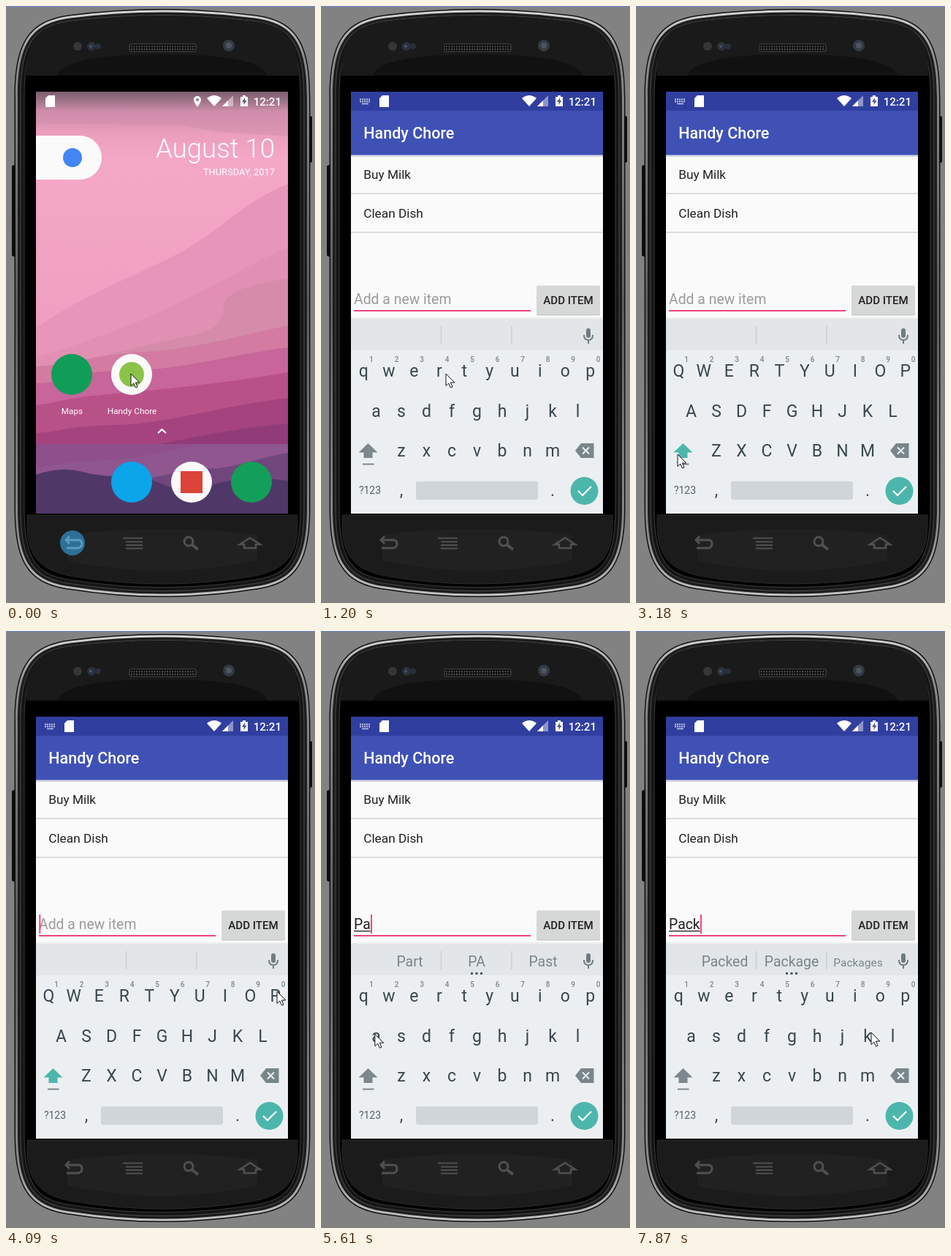
Recreate the animation shown at these times as an HTML page. Size 423 by 815 pixels, loop 7990 ms.

```html
<!DOCTYPE html>
<html lang="en">
<head>
<meta charset="utf-8">
<title>To-do app</title>
<style>
html, body { margin: 0; width: 100%; height: 100%; overflow: hidden; background: #828282; }
svg { display: block; width: 423px; height: 815px; font-family: Roboto, "Open Sans", sans-serif; }
text { white-space: pre; }
.mid { text-anchor: middle; }
.end { text-anchor: end; }
.bold { font-weight: 500; }
</style>
</head>
<body>
<svg viewBox="0 0 423 815">
  <defs>
    <linearGradient id="rim" x2="0" y2="1">
      <stop offset="0" stop-color="#d8d8d8"/><stop offset=".08" stop-color="#8c8c8c"/>
      <stop offset=".5" stop-color="#5c5c5c"/><stop offset=".9" stop-color="#8c8c8c"/>
      <stop offset="1" stop-color="#c4c4c4"/>
    </linearGradient>
    <linearGradient id="sky" x2="0" y2="1">
      <stop offset="0" stop-color="#ac8396"/><stop offset=".045" stop-color="#c98ba8"/>
      <stop offset=".1" stop-color="#ec9fbd"/><stop offset=".16" stop-color="#f5a8c5"/>
      <stop offset=".5" stop-color="#f0a0c1"/><stop offset="1" stop-color="#e58fb6"/>
    </linearGradient>
    <linearGradient id="shade" x2="0" y2="1">
      <stop offset="0" stop-opacity=".28"/><stop offset="1" stop-opacity="0"/>
    </linearGradient>
    <clipPath id="screen"><path d="M41 117h345v576H41z"/></clipPath>
    <clipPath id="reveal"><rect id="window"/></clipPath>
    <path id="card" d="M58 122h9v16H54V126z"/>
    <path id="arrow" d="M0 0V16.500L3.800 13L6.500 19L9 18L6.400 12H11.800z" fill="#fff" stroke="#111"/>
    <g id="meters" fill="#fff">
      <path d="M275 126Q285 118 295 126L285 137z"/>
      <path d="M296 137L311 122V137z" opacity=".45"/><path d="M296 137L304 129V137z"/>
      <path d="M321 124h3v-2h4v2h3v13h-10z"/>
      <path d="M327 125l-4 6h2.500v4l4-6H327z" fill="#555c80"/>
      <text x="377" y="136" font-size="15.1" class="end bold">12:21</text>
    </g>
  </defs>

  <path d="M0 0H423V1.500H0z" fill="#6f86b5"/>
  <g id="phone"><path d="M8 219q0-2 5-2v125q-5 0-5-2zM415 150q4 0 4 2v60q0 2-4 2z" fill="#0c0c0c"/></g>

  <path d="M28 95C28 42 45 27 88 21Q214 5 340 21C383 27 400 42 400 95z" fill="#1a1a1a"/>
  <path d="M70 95Q80 66 214 66T358 95z" fill="#111"/>
  <circle cx="98" cy="55" r="6" fill="#363636"/>
  <circle cx="117" cy="55" r="6" fill="#2a313b"/><circle cx="126" cy="55" r="4" fill="#28303c"/>
  <circle cx="116" cy="55" r="2" fill="#45546c"/>
  <circle cx="305" cy="54" r="8" fill="#343a42"/><circle cx="305" cy="54" r="4" fill="#4c5562"/>
  <rect x="169" y="52" width="91" height="10" rx="2" fill="#0a0a0a" stroke="#4b4b4b"/>
  <path d="M171 55.500H259M171 59H259" stroke="#555" stroke-width="2" stroke-dasharray="2 1.500"/>

  <path d="M29 695H399V712C398 752 380 770 340 778Q214 800 88 778C48 770 30 752 29 712z" fill="#1b1b1b" stroke="#292929"/>
  <path d="M84 722Q214 706 344 722V757Q214 785 84 757z" fill="#212121"/>
  <circle id="glow" cx="91" cy="733" r="17" fill="#2d7097"/>
  <g fill="none" stroke="#505050" stroke-width="3">
    <path id="back" d="M84 729H99Q104 729 104 734T99 740H83M87 724L82 729L87 734"/>
    <path d="M160 726.500H187M164 731.500H187M164 736H187M164 740.500H187" stroke-width="2.200"/>
    <circle cx="250" cy="731" r="6"/><path d="M254 735L263 742" stroke-width="4"/>
    <path d="M320 735L334 726L348 735H342V740H326V735z" stroke-width="2.500"/>
  </g>

  <g clip-path="url(#screen)">
    <path d="M41 117H386V693H41z" fill="url(#sky)"/>
    <path d="M41 142H386V178L290 172L240 163L41 160z" fill="#d28fad" opacity=".55"/>
    <path d="M386 243C330 265 300 300 250 330S110 390 41 440V600H386z" fill="#e895ba"/>
    <path d="M386 330C300 365 240 420 41 480V600H386z" fill="#e18fb3"/>
    <path d="M386 372C350 378 305 385 298 408C296 440 280 445 230 455L120 480L41 500V600H386z" fill="#d48caa"/>
    <path d="M386 436C320 450 260 468 190 472S90 490 41 492V600H386z" fill="#d37ba1"/>
    <path d="M386 466C300 478 230 498 160 498S80 515 41 515V600H386z" fill="#c8659a"/>
    <path d="M386 500C300 515 200 525 140 530S80 540 41 545V600H386z" fill="#b95189"/>
    <path d="M386 535C300 545 220 570 150 572S80 580 41 583V600H386z" fill="#a5437f"/>
    <path d="M386 570C330 574 270 586 200 600H386z" fill="#913c78"/>
    <path d="M41 598H386V693H41z" fill="#8f4f8c"/>
    <path d="M386 598H260Q190 620 100 622L41 630V693H386z" fill="#90568f"/>
    <path d="M386 610C340 618 310 632 270 632S210 650 150 645V693H386z" fill="#70467d"/>
    <path d="M41 640Q75 628 105 636T165 641Q195 643 222 656T290 651Q340 642 386 648V693H41z" fill="#4f3867"/>
    <path d="M41 117H386V143H41z" fill="url(#shade)"/>

    <path d="M41 177H101a30 30 0 0 1 0 60H41z" fill="#fafafa"/>
    <circle cx="91" cy="207" r="13" fill="#4285f4"/>
    <g fill="#fff" class="end">
      <text x="368" y="207" font-size="36.6" font-weight="300">August 10</text>
      <text x="368" y="231" font-size="12.9">THURSDAY, 2017</text>
    </g>
    <circle cx="90" cy="503" r="28" fill="#109d58"/>
    <circle cx="172" cy="503" r="28" fill="#fafafa"/><circle cx="172" cy="503" r="17" fill="#8bc34a"/>
    <circle cx="172" cy="650" r="28" fill="#0ba5ea"/>
    <circle cx="254" cy="650" r="28" fill="#fafafa"/><path d="M239 635h30v30h-30z" fill="#db4437"/>
    <circle cx="336" cy="650" r="28" fill="#139e59"/>
    <g fill="#fff" class="mid" font-size="11.8">
      <text x="90.500" y="557">Maps</text><text x="172.500" y="557">Handy Chore</text>
    </g>
    <path d="M208 583L213.500 578L219 583" fill="none" stroke="#fff" stroke-width="2.200"/>
    <g id="homeBar" fill="#fff">
      <use href="#card"/><use href="#meters"/>
      <path id="pin" fill-rule="evenodd" d="M262 138Q257 131 257 128a5 5 0 0 1 10 0Q267 131 262 138zM260 128a2 2 0 0 0 4 0a2 2 0 0 0-4 0z"/>
    </g>

    <g clip-path="url(#reveal)">
      <g id="app">
        <path d="M41 117H386V760H41z" fill="#fafafa"/>
        <g id="content">
          <path d="M41 204H386V206H41z" fill="#d9d9df"/>
          <path d="M41 117H386V143H41z" fill="#303f9f"/>
          <path d="M41 143H386V203.500H41z" fill="#3f51b5"/>
          <text x="58.200" y="181" font-size="21.56" class="bold" fill="#fff">Handy Chore</text>
          <g font-size="17.25" fill="#212121">
            <text x="58.200" y="236">Buy Milk</text><text x="58.200" y="289">Clean Dish</text>
          </g>
          <path d="M41 256H386M41 309H386" stroke="#dcdcdc" stroke-width="2"/>
          <g id="entry">
            <text id="hint" x="45" y="407" font-size="19.4" fill="#9b9b9b">Add a new item</text>
            <text id="typed" x="45" y="407" font-size="19.4" fill="#212121"></text>
            <rect id="under" x="45" y="409" height="1.300" fill="#212121"/>
            <path d="M45 416H287" stroke="#f0437f" stroke-width="2"/>
            <rect id="caret" y="387" width="2" height="26" fill="#ff4081"/>
            <rect x="295" y="382.500" width="87" height="40" rx="2" fill="#c2c3c3"/>
            <rect x="295" y="381.500" width="87" height="40" rx="2" fill="#d6d7d7"/>
            <text x="338.500" y="407" font-size="15.1" class="mid bold" fill="#212121">ADD ITEM</text>
          </g>
          <g id="board">
            <path d="M41 425H386V427H41z" fill="#eeefef"/>
            <path d="M41 427H386V693H41z" fill="#eceff1"/>
            <path d="M41 427H386V470H41z" fill="#e2e6e9"/>
            <path d="M164.500 437V462M261 437V462" stroke="#c9d0d3" stroke-width="1.500"/>
            <g fill="none" stroke="#6f7c82" stroke-width="2">
              <rect x="363" y="440" width="6" height="13" rx="3" fill="#6f7c82" stroke="none"/>
              <path d="M360 449Q360 456 366 456T372 449M366 456V461"/>
            </g>
            <g id="words" class="mid" fill="#78868c"></g>
            <path id="dots" d="M205 466h3v3h-3zM211.500 466h3v3h-3zM218 466h3v3h-3z" fill="#455a64"/>
            <g id="keys" class="mid" fill="#37474f" font-size="23"></g>
            <path id="shift" d="M64.500 597L77.500 609.500H70.500V617H58.500V609.500H51.500z"/>
            <path d="M57 625.500H72.500" stroke="#7b888e" stroke-width="2"/>
            <path d="M348 607L356 597H373.500V617H356z" fill="#78868c"/>
            <path d="M358 602.500L367 611.500M367 602.500L358 611.500" stroke="#eceff1" stroke-width="2"/>
            <g class="mid" fill="#37474f">
              <text x="67" y="666" font-size="14" fill="#546269">?123</text>
              <text x="110" y="669" font-size="23">,</text><text x="317" y="669" font-size="23">.</text>
            </g>
            <rect x="130" y="649" width="167" height="25" rx="3" fill="#cfd5d8"/>
            <circle cx="360.500" cy="662" r="19" fill="#4db6ac"/>
            <path d="M352 662L358 668L370 656" fill="none" stroke="#fff" stroke-width="2.200"/>
          </g>
        </g>
      </g>
    </g>
    <g id="appBar">
      <use href="#meters"/><use href="#card" x="26" fill="#fff"/>
      <path d="M53 127.500H68M53 130.500H68" stroke="#c3c8e4" stroke-width="2" stroke-dasharray="2 1"/>
      <path d="M56 133.500H65" stroke="#c3c8e4" stroke-width="1.500"/>
    </g>
  </g>
  <use id="pointer" href="#arrow"/>
</svg>

<script>
const LOOP = 7990;
const $ = id => document.getElementById(id);
const clamp = v => Math.max(0, Math.min(1, v));
const mix = (a, b, p) => a + (b - a) * p;
const show = (id, on) => $(id).setAttribute('visibility', on ? 'visible' : 'hidden');
const moveY = (id, y) => $(id).setAttribute('transform', `translate(0 ${y})`);

function add(parent, tag, attrs, text = '') {
  const el = document.createElementNS('http://www.w3.org/2000/svg', tag);
  for (const name in attrs) el.setAttribute(name, attrs[name]);
  el.textContent = text;
  return $(parent).appendChild(el);
}

// Nested outlines of the phone body
function body(i) {
  const l = 11.5 + i, r = 416.5 - i, t = 12 + i, b = 797 - i;
  return `M${l} 125C${l} 48 ${32 + i} ${19 + i} 88 ${t}Q214 ${t - 16} 340 ${t}` +
    `C${396 - i} ${19 + i} ${r} 48 ${r} 125V685C${r} 762 ${396 - i} ${790 - i} 340 ${b}` +
    `Q214 ${b + 20} 88 ${b}C${32 + i} ${790 - i} ${l} 762 ${l} 685Z`;
}
[[0, '#111'], [1.5, 'url(#rim)'], [4.5, '#1d1d1d'], [8, '#4a4a4a'], [9, '#151515'], [13, '#3a3a3a'], [14, '#000']]
  .forEach(([inset, fill]) => add('phone', 'path', { d: body(inset), fill }));

const keys = [];
[['qwertyuiop', 58.3, 506], ['asdfghjkl', 75.5, 561], ['zxcvbnm', 110, 615]].forEach(([row, x, y]) =>
  [...row].forEach((c, i) => keys.push(add('keys', 'text', { x: x + 34.5 * i, y }, c))));
for (let i = 0; i < 10; i++)
  add('keys', 'text', { x: 69 + 34.5 * i, y: 486, 'font-size': 10, class: 'bold', fill: '#78868c' }, (i + 1) % 10);
const words = [121.5, 213, 304].map(x => add('words', 'text', { x, y: 458 }));

// time, entered text, suggestions
const typing = [
  [160, '', ['', '', '']],
  [4270, 'P', ['Play', 'Part', 'Post']],
  [5600, 'Pa', ['Part', 'PA', 'Past']],
  [6780, 'Pac', ['Pace', 'Pack', 'Pact']],
  [7700, 'Pack', ['Packed', 'Package', 'Packages']]
];

// time, x, y of the pointer tip
const path = [
  [0, 171, 502], [2110, 171, 502], [2340, 214, 530], [2940, 57, 611], [3120, 57, 612],
  [3450, 57, 612], [3590, 394, 493], [3760, 394, 490], [4090, 371, 492], [4300, 370, 492],
  [4740, 157, 511], [5030, 94, 546], [5270, 72, 549], [5600, 72, 549], [6240, 180, 619],
  [6360, 182, 618], [6600, 178, 612], [6830, 178, 612], [7550, 323, 555], [7670, 330, 562],
  [7870, 322, 548], [LOOP, 322, 548]
];

function pointerAt(t) {
  const i = path.findIndex(k => k[0] > t);
  const [a, b] = [path[i - 1], path[i]];
  const p = (t - a[0]) / (b[0] - a[0]);
  return [mix(a[1], b[1], p), mix(a[2], b[2], p)];
}

function drawEntry(t) {
  const [since, text, options] = typing.findLast(k => k[0] <= t) || typing[0];
  $('typed').textContent = text;
  show('hint', !text);
  show('dots', text);
  words.forEach((w, i) => {
    w.textContent = options[i];
    w.setAttribute('font-size', options[i].length > 7 ? 15.5 : 19.4);
  });
  const width = text ? $('typed').getComputedTextLength() : 0;
  $('under').setAttribute('width', width);
  $('caret').setAttribute('x', 45.3 + width);
  const phase = Math.floor((t - since) / 500) % 2;
  show('caret', text ? phase === 0 : phase === 1);
}

function draw(t) {
  show('glow', t < 370);
  $('back').setAttribute('stroke', t < 370 ? '#5c9bbd' : '#505050');

  // The app window grows out of its icon
  const u = clamp((t - 520) / 410);
  const p = 1 - (1 - u) ** 1.4;
  const wide = clamp(u * 2.2);
  const left = mix(144, 41, wide), right = mix(200, 386, wide);
  const top = mix(475, 117, p), bottom = mix(531, 693, p);
  const box = { x: left, y: top, width: t < 520 ? 0 : right - left, height: bottom - top };
  for (const k in box) $('window').setAttribute(k, box[k]);
  moveY('app', 51 * (1 - p));
  $('content').setAttribute('opacity', clamp((t - 720) / 184));
  show('pin', t < 600);
  show('homeBar', t < 900);
  show('appBar', t >= 900);

  const rise = 1 - (1 - clamp((t - 1040) / 160)) ** 2;
  moveY('board', 268 * (1 - rise));
  moveY('entry', t < 1070 ? 266 : 0);

  const upper = t >= 3150 && t < 4270;
  keys.forEach(k => k.textContent = upper ? k.textContent.toUpperCase() : k.textContent.toLowerCase());
  $('shift').setAttribute('fill', upper ? '#4db6ac' : '#7b888e');
  drawEntry(t);
  $('pointer').setAttribute('transform', `translate(${pointerAt(t)})`);
}

function tick() {
  draw(performance.now() % LOOP);
  requestAnimationFrame(tick);
}
tick();
</script>
</body>
</html>
```
